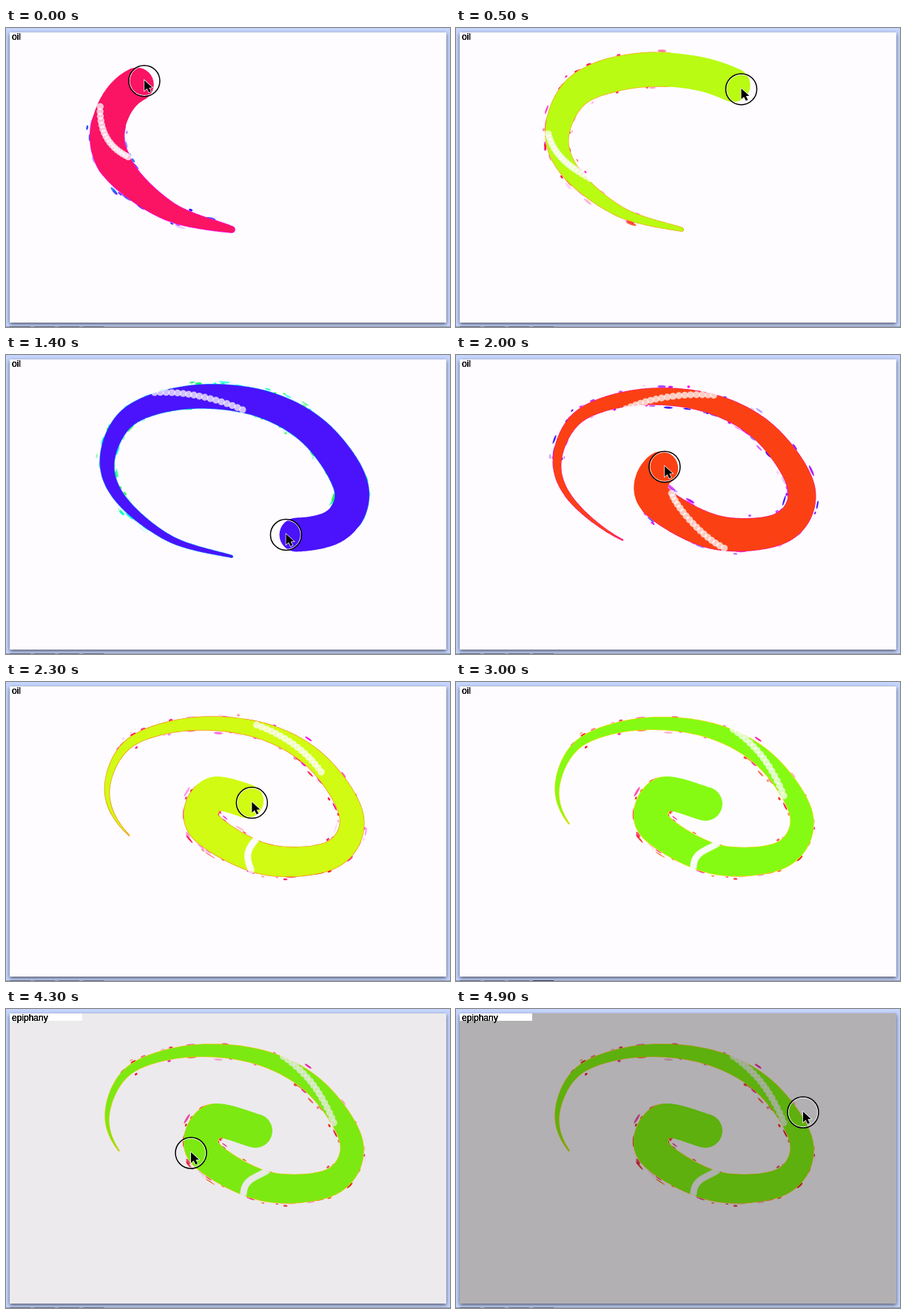
Write an HTML page with a canvas that moves like this. It is 600 px wide and 405 px high and loops after 5 s.

```html
<!DOCTYPE html>
<html lang="en">
<head>
<meta charset="utf-8">
<title>Spiral brush</title>
<style>
html, body { margin: 0; width: 100%; height: 100%; overflow: hidden; background: #c5d5fe; }
canvas { display: block; }
</style>
</head>
<body>
<canvas id="stage" width="600" height="405"></canvas>
<script>
const g = document.getElementById('stage').getContext('2d');
const LOOP = 5000, STEP = 100, PAINT_END = 2400, TAU = Math.PI * 2;
const PAPER = '#fefcff', BRUSH = 23;

// Centre line of the stroke; u counts along these points.
const spine = [
  [305, 273], [222, 249], [155, 195], [137, 140], [168, 82], [250, 57], [345, 66],
  [420, 108], [467, 182], [440, 234], [350, 240], [268, 194], [280, 152], [337, 165]
];
const LAST = spine.length - 1;

// Time, then u of the brush head.
const headKeys = [[0, 4.28], [500, 6.5], [1400, 9.7], [2000, 12.05], [2400, 13.15]];
// Time, then centre and tilt of the pale cut that wanders along the stroke.
const cutKeys = [[0, 2.83, -20], [500, 2.33, -13], [1400, 5.15, 15], [2000, 5.4, -13], [2400, 6.95, 12]];
// Time, then x and y of the pointer after painting.
const awayKeys = [[2400, 338, 166], [2900, 118, 430], [3700, 118, 430], [4300, 250, 195], [4900, 469, 140]];

const clamp = (v, lo, hi) => Math.max(lo, Math.min(hi, v));

function mix(keys, t) {
  const i = clamp(keys.findIndex(k => k[0] > t), -1, keys.length);
  const b = keys.at(i), a = keys[i - 1] ?? b;
  const f = i > 0 ? (t - a[0]) / (b[0] - a[0]) : 1;
  return b.slice(1).map((v, j) => i > 0 ? a[j + 1] + (v - a[j + 1]) * f : v);
}

function spot(u) {
  u = clamp(u, 0, LAST);
  const i = Math.min(LAST - 1, Math.floor(u)), f = u - i;
  const [p, q, r, s] = [-1, 0, 1, 2].map(k => spine[clamp(i + k, 0, LAST)]);
  return [0, 1].map(n => {
    const a = p[n], b = q[n], c = r[n], d = s[n];
    return b + f * (c - a + f * (2 * a - 5 * b + 4 * c - d + f * (3 * (b - c) + d - a))) / 2;
  });
}

function heading(u) {
  const [x0, y0] = spot(u - .03), [x1, y1] = spot(u + .03);
  return Math.atan2(y1 - y0, x1 - x0);
}

// Positive offsets lie on the inner side of the spiral.
function beside(u, off) {
  const [x, y] = spot(u), a = heading(u);
  return [x - Math.sin(a) * off, y + Math.cos(a) * off];
}

// Full width just behind the head, then worn down evenly to nothing.
function radius(u, head) {
  const reach = Math.min(head + .5, 11.3);
  return BRUSH * clamp((reach - head + u) / (reach - 2), 0, 1);
}

function randomizer(seed) {
  return () => (seed = (seed * 16807) % 2147483647) / 2147483647;
}

const rand = randomizer(4127);
const flecks = Array.from({ length: 260 }, () => ({
  u: rand() * 13, side: rand() < .6 ? -1 : 1, gap: rand() ** 2 * 5,
  len: 2 + rand() ** 2 * 6, fat: .6 + rand() * 1.2,
  hue: 65 + rand() * 65, phase: rand() * TAU
}));

function dot(x, y, r) {
  g.moveTo(x + r, y);
  g.arc(x, y, r, 0, TAU);
}

function ribbon(head, end, grow, color) {
  g.fillStyle = color;
  g.beginPath();
  for (let u = 0; u <= end; u += .02) {
    const r = radius(u, head);
    if (r > .5) dot(...spot(u), r + grow);
  }
  g.fill();
}

// A row of pale beads crossing the stroke from one edge to the other.
function cut(mid, span, tilt, bow) {
  g.fillStyle = PAPER;
  g.globalAlpha = .75;
  for (let f = -.5; f <= .5; f += .06) {
    g.beginPath();
    dot(...beside(mid + span * f + bow * Math.cos(f * Math.PI), tilt * 2 * f), 4.7);
    g.fill();
  }
  g.globalAlpha = 1;
}

function painting(t) {
  const [head] = mix(headKeys, t), end = Math.min(LAST, head - .13);
  const ink = back => `hsl(${339 + t * .1965 - back} 97% 53%)`;

  for (const s of flecks) {
    const r = radius(s.u, head), alpha = Math.sin(s.phase + t * .004);
    if (s.u > end - 1 || r < 5 || alpha <= 0) continue;
    g.globalAlpha = alpha;
    g.fillStyle = ink(s.hue);
    g.beginPath();
    g.ellipse(...beside(s.u, s.side * (r + s.gap)), s.len, s.fat, heading(s.u), 0, TAU);
    g.fill();
  }
  g.globalAlpha = 1;

  ribbon(head, end - 1, .7, ink(40));
  ribbon(head, end, 0, ink(0));

  const [mid, tilt] = mix(cutKeys, t);
  cut(mid, 1.3, tilt, 0);
  if (t >= 1800) {
    const k = clamp((t - 2000) / 400, 0, 1);
    cut(10.3 - .17 * k, 1.2 * k - 1, -21, .1 * k);
  }
}

function pointer(x, y) {
  for (const [r, width, color] of [[19.8, 1, '#fff'], [21, 1.5, '#000']]) {
    g.lineWidth = width;
    g.strokeStyle = color;
    g.beginPath();
    dot(x, y, r);
    g.stroke();
  }
  g.save();
  g.translate(x, y - 1);
  g.scale(.9, .9);
  g.beginPath();
  for (const p of [[0, 0], [0, 16], [4, 12.5], [7, 18.5], [10, 17], [7, 11.5], [12, 11]]) g.lineTo(...p);
  g.closePath();
  g.lineWidth = 1.5;
  g.strokeStyle = '#fff';
  g.stroke();
  g.fillStyle = '#000';
  g.fill();
  g.restore();
}

function box(color, x, y, w, h) {
  g.fillStyle = color;
  g.fillRect(x, y, w, h);
}

function draw(t) {
  box('#c5d5fe', 0, 0, 600, 405);
  g.save();
  g.shadowColor = 'rgba(0,0,0,.6)';
  g.shadowBlur = 5;
  g.shadowOffsetY = 2;
  box(PAPER, 5, 6, 590, 393);
  g.restore();

  const chosen = t >= 2900 && t < 3800;
  box('#8f9cba', 0, 404, 600, 1);
  for (let i = 0; i < 4; i++) box(chosen && i === 3 ? '#30384a' : '#5f6b85', 5 + i * 33, 404, 28, 1);

  painting(Math.min(t, PAINT_END));
  box(`rgba(0,0,0,${.3 * clamp((t - 4150) / 650, 0, 1)})`, 5, 6, 590, 393);

  const late = t >= 3200;
  if (late) box('#fff', 5, 6, 98, 10);
  g.fillStyle = '#000';
  g.font = '12px "Liberation Sans", Arial, sans-serif';
  for (let i = 0; i < 3; i++) g.fillText(late ? 'epiphany' : 'oil', 8, 16);

  pointer(...(t < PAINT_END ? spot(mix(headKeys, t)[0]) : mix(awayKeys, t)));
}

const start = performance.now();
function tick() {
  const t = (performance.now() - start) % LOOP;
  draw(Math.floor(t / STEP) * STEP);
  requestAnimationFrame(tick);
}
tick();
</script>
</body>
</html>
```
